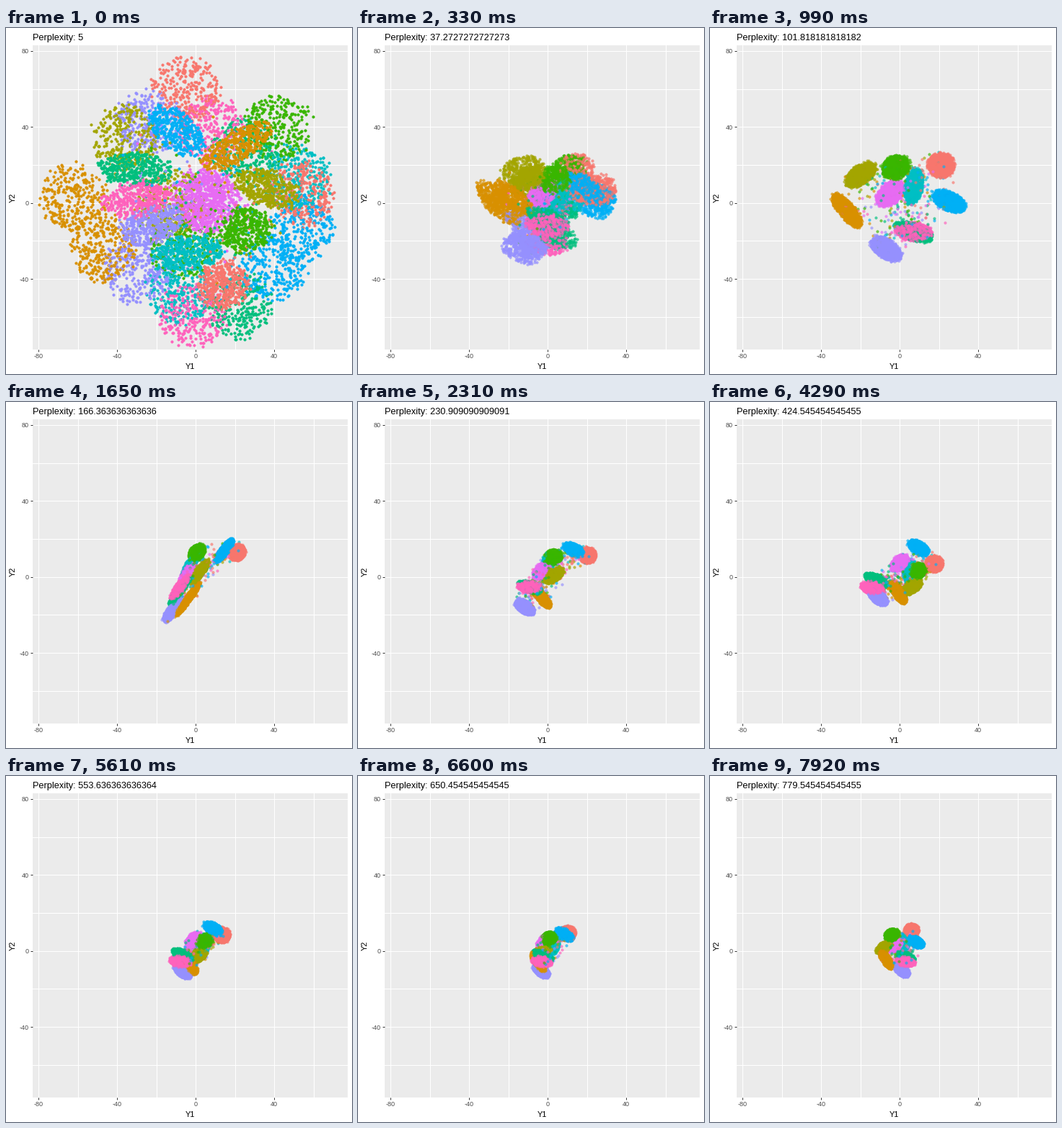
Recreate the animation shown at these times as a matplotlib script. Size 480 by 480 pixels, loop 8 s.

```python
import numpy as np
import matplotlib.pyplot as plt
from matplotlib.animation import FuncAnimation

SIZE, DPI = 480, 80
PX = 72 / DPI                    # one pixel in points
LOOP, TICK, HOLD = 8000, 40, 330
STEPS, COUNT, CHUNK = 25, 1000, 200

plt.rcParams["font.family"] = "Liberation Sans"
plt.rcParams["axes.unicode_minus"] = False

# Steps at which the clusters and their common radius have key values.
KEYS = [0, 3, 5, 13, 24]
RADII = [12.5, 6.5, 4.1, 4.2, 3.4]

# Colour, early and late tilt, elongation, loose spots at the start, path.
CLUSTERS = [
    ("#F8766D", 45, 0, 1.1, [-5+60j, 53+5j],
     [14-43j, 21+20j, 21+13j, 17.5+7j, 6+11j]),
    ("#D89000", 33, -58, 2.6, [-62+3j, -47-24j],
     [21+30j, -27-4j, -4-11.5j, -1-8j, -7-4.5j]),
    ("#A3A500", -22, 35, 1.8, [-36+35j, -12+0j],
     [36+8j, -20+15j, 2+3j, 6-5j, -8+2j]),
    ("#39B600", 20, 30, 1.2, [42+40j, -6-22j],
     [25-14j, -2+19j, 0.5+13j, 9+3.5j, -4+8.5j]),
    ("#00BF7D", 0, -25, 2.2, [25+28j, 22-54j],
     [-31+18j, 7-15j, -8-6.5j, -12-1.5j, 3-3j]),
    ("#00BFC4", 5, 80, 2.0, [-8-46j, 51+14j],
     [-4-26j, 7+9j, -2+8j, 5+3j, 2+4j]),
    ("#00B0F6", -40, -30, 1.8, [53-14j, 39-34j],
     [-10+38j, 25+1j, 14.5+14j, 9.5+15.5j, 8+5j]),
    ("#9590FF", 22, -40, 1.7, [-30-36j, -24+43j],
     [-22-11j, -7-24j, -12-17.5j, -11-10.5j, 1-10j]),
    ("#E76BF3", 75, 40, 1.5, [5+1j],
     [4+2j, -5+5j, -4+2j, 0+7.5j, -2.5+3j]),
    ("#FF62BC", 8, -8, 1.9, [8+38j, -2-59j],
     [-30+2j, 7-15j, -8-5j, -14-5.5j, 3-5.5j]),
]
colors, early, late, stretch, spots, paths = zip(*CLUSTERS)
early, late, stretch = (np.array(v)[:, None] for v in (early, late, stretch))
spot = np.array([np.resize(s, COUNT) for s in spots])

# Points of the unit disk with a soft rim, shared by every step.
rng = np.random.default_rng(7)
shape = (len(CLUSTERS), COUNT)
disk = np.sqrt(rng.random(shape)) * np.exp(2j * np.pi * rng.random(shape))
disk += rng.normal(0, 0.07, shape) + 1j * rng.normal(0, 0.07, shape)

loose = np.arange(COUNT) < 600   # drawn first, under the dense part
other = rng.integers(0, len(CLUSTERS), shape)
lure = np.where(rng.random(shape) < 0.04, rng.uniform(0.2, 1, shape), 0)


def place(step):
    spread = max(0, 1 - step / 3) ** 4            # the wide start collapses
    squeeze = np.exp(-((step - 5) / 1.2) ** 2)    # thin diagonal strands
    time = step if step > 3 else 3 * (1 - spread)

    home = np.array([np.interp(time, KEYS, p) for p in paths])
    center = home[:, None] + (spot - home[:, None]) * spread * loose
    center = center + lure * (home[other] - center)

    tilt = late + (early - late) * spread
    tilt = np.radians(tilt + (55 - tilt) * squeeze)
    ratio = np.sqrt(stretch ** (1 + squeeze - spread * loose))
    radius = np.interp(time, KEYS, RADII) * (1 + 0.35 * spread * loose)
    ellipse = disk.real * ratio + 1j * disk.imag / ratio
    return center + radius * ellipse * np.exp(1j * tilt), 0.6 + 0.4 * spread


clouds = [place(s) for s in range(STEPS)]

fig = plt.figure(figsize=(SIZE / DPI, SIZE / DPI), dpi=DPI, facecolor="white")
ax = fig.add_axes([37 / SIZE, 34 / SIZE, 437 / SIZE, 422 / SIZE],
                  facecolor="#EBEBEB")
ax.set_xlim(-82.94, 77.36)
ax.set_ylim(-77.18, 83.02)
ax.set_xticks(range(-80, 41, 40))
ax.set_yticks(range(-40, 81, 40))
for axis in (ax.xaxis, ax.yaxis):
    axis.set_ticks(range(-60, 61, 40), minor=True)
ax.grid(True, which="both", color="white", linewidth=PX)
ax.set_axisbelow(True)
ax.tick_params(which="major", length=3 * PX, width=PX, pad=2 * PX,
               color="#333333", labelcolor="#4D4D4D", labelsize=9 * PX)
ax.tick_params(which="minor", length=0)
ax.spines[:].set_visible(False)


def label(x, y, text, size, **kw):
    return fig.text(x / SIZE, 1 - y / SIZE, text, fontsize=size * PX,
                    color="black", **kw)


title = label(37, 17, "", 12.8, ha="left", va="baseline")
label(255.5, 473, "Y1", 11, ha="center", va="baseline")
label(15, 235, "Y2", 11, ha="right", va="center", rotation=90)

lines = []
for start in range(0, COUNT, CHUNK):
    for c in rng.permutation(len(CLUSTERS)):
        line, = ax.plot([], [], "o", color=colors[c], markersize=3.3 * PX,
                        markeredgewidth=0.8 * PX)
        lines.append((line, c, slice(start, start + CHUNK)))


def update(frame):
    step = min((frame * TICK + TICK - 10) // HOLD, STEPS - 1)
    points, alpha = clouds[step]
    for line, c, part in lines:
        line.set_data(points[c, part].real, points[c, part].imag)
        line.set_alpha(alpha)
    title.set_text(f"Perplexity: {5 + step * 3195 / 99:.15g}")
    return [title] + [item[0] for item in lines]


anim = FuncAnimation(fig, update, frames=LOOP // TICK, interval=TICK,
                     repeat=True, repeat_delay=0, cache_frame_data=False)
plt.show()
```
